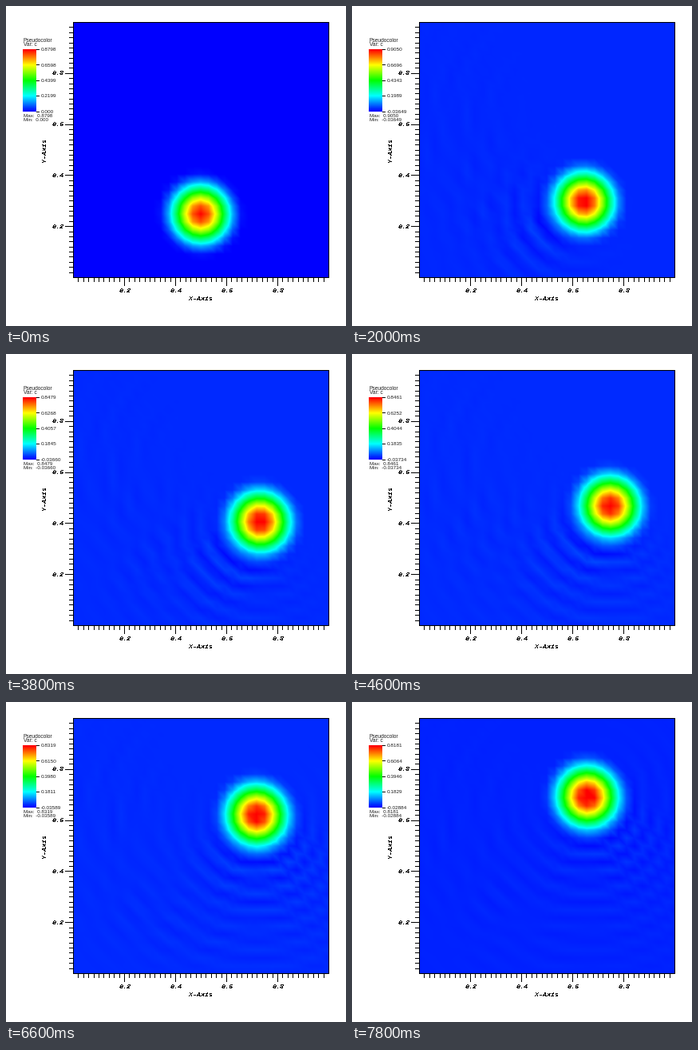
Animation, 426 px wide and 400 px high, one loop 8000 ms. Source, as a matplotlib script:

```python
import numpy as np
import matplotlib.pyplot as plt
from matplotlib.animation import FuncAnimation
from matplotlib.colors import LinearSegmentedColormap

W, H, DPI = 426, 400, 100
PX = 72 / DPI
LEFT, TOP, SIZE = 84, 20, 320
BOTTOM = TOP + SIZE
FRAMES, INTERVAL = 40, 200
CELLS = 32

# value range of the field over time
KEYS = [0, 5, 10, 15, 23, 33, 39]
MAXIMA = [0.87978, 0.9063, 0.9050, 0.8498, 0.8461, 0.8319, 0.8181]
MINIMA = [0, -0.02988, -0.03649, -0.03586, -0.03734, -0.03589, -0.02884]

rainbow = LinearSegmentedColormap.from_list(
    "rainbow5", ["#0000ff", "#00ffff", "#00ff00", "#ffff00", "#ff0000"], N=1024)

nodes = np.linspace(0, 1, CELLS + 1)
X, Y = np.meshgrid(nodes, nodes)

# position of every pixel inside the triangle mesh
pos = (np.arange(SIZE) + 0.5) / SIZE * CELLS
cell = pos.astype(int)
U, V = np.meshgrid(pos - cell, pos - cell)
I, J = np.meshgrid(cell, cell)


def interpolate(z):
    """Linear interpolation on cells split along the falling diagonal."""
    a, b, c, d = z[J, I], z[J, I + 1], z[J + 1, I], z[J + 1, I + 1]
    lower = a + U * (b - a) + V * (c - a)
    upper = d + (1 - U) * (c - d) + (1 - V) * (b - d)
    return np.where(U + V <= 1, lower, upper)


def limits(k):
    return np.interp(k, KEYS, MINIMA), np.interp(k, KEYS, MAXIMA)


def field(k):
    lo, hi = limits(k)
    turn = np.radians(3.6 * k)
    dx = X - 0.5 - 0.25 * np.sin(turn)
    dy = Y - 0.5 + 0.25 * np.cos(turn)
    r = np.hypot(dx, dy)

    # cosine hill whose top flattens with time
    radius = np.interp(k, [0, 5, 39], [0.172, 0.169, 0.176])
    hill = 0.5 + 0.5 * np.cos(np.pi * np.minimum(r / radius, 1))
    gain = np.interp(k, [5, 39], [1, 1.06])
    hill = hi * np.minimum(hill * gain / hill.max(), 1)

    # curved ripples trailing behind the hill along its circular path
    behind = np.arctan2(dy, dx) - (turn * 5 / 6 + np.pi)
    behind = np.angle(np.exp(1j * behind))
    wave = np.interp(k, [5, 15], [0.092, 0.074])
    focus = np.interp(k, [5, 33], [1.6, 0.7])
    reach = np.interp(k, [5, 33], [0.12, 0.24])
    ripple = np.cos(2 * np.pi * (r - 0.19) / wave)
    ripple *= 0.8 * np.exp(-(r - 0.19) / reach - focus * behind ** 2)
    ripple *= np.clip((r - 0.12) / 0.06, 0, 1)

    # faint broken streaks left over in the lower left
    px, py = 0.6 - X, 0.62 - Y
    rho = np.hypot(px, py) + 1e-9
    side = np.clip((px + 0.6 * py) / rho, 0, 1)
    rest = np.cos(2 * np.pi * rho / 0.085 - 0.25 * k) * np.cos(14 * (X - Y))
    rest *= 0.14 * side * np.exp(-((rho - 0.45) / 0.22) ** 2) * min(k / 10, 1)

    return interpolate(hill + lo * (ripple + rest))


fig = plt.figure(figsize=(W / DPI, H / DPI), dpi=DPI, facecolor="white")
ax = fig.add_axes([0, 0, 1, 1])
ax.axis("off")


def line(x0, y0, x1, y1):
    ax.plot([x0, x1], [y0, y1], color="black", lw=PX, antialiased=False,
            snap=False, solid_capstyle="butt", zorder=3)


def axis_text(x, y, s, **kw):
    ax.text(x, y, s, size=8.4 * PX, family="Liberation Mono", weight="bold",
            style="italic", ha="center", va="center", antialiased=False, **kw)


def legend_text(x, y, s="", size=6.5):
    return ax.text(x, y, s, size=size * PX, family="Liberation Sans",
                   color="#202020", va="center")


image = ax.imshow(field(0), cmap=rainbow, origin="lower", aspect="auto",
                  interpolation="nearest",
                  extent=(LEFT, LEFT + SIZE, BOTTOM, TOP))
ax.imshow(np.linspace(1, 0, 78)[:, None], cmap=rainbow, aspect="auto",
          interpolation="nearest", extent=(21, 38, 132, 54))
ax.set_xlim(0, W)
ax.set_ylim(H, 0)

# frame, running through pixel centres
x0, x1, y0, y1 = LEFT + 0.5, LEFT + SIZE + 0.5, TOP + 0.5, BOTTOM - 0.5
for edge in [(x0, y0, x1 + 0.5, y0), (x0, y1, x1 + 0.5, y1),
             (x0, y0, x0, y1), (x1, y0, x1, y1)]:
    line(*edge)

# ticks
for n in range(1, 50):
    major = n % 10 == 0
    length = 10 if major else 5
    tx = int(x0 + n / 50 * (x1 - x0)) + 0.5
    ty = int(y1 - n / 50 * (y1 - y0)) + 0.5
    line(tx, BOTTOM, tx, BOTTOM + length)
    line(LEFT - length, ty, LEFT, ty)
    if major:
        label = f"{n / 50:.1f}"
        axis_text(tx + 0.5, 356.5, label)
        axis_text(65, ty + 0.5, label)

axis_text(244, 366, "X-Axis")
axis_text(49, 180, "Y-Axis", rotation=90)

# legend
legend_text(21.5, 43.5, "Pseudocolor", 6.7)
legend_text(21.5, 48.5, "Var: c", 6.7)
levels = []
for i in range(5):
    y = 54 + 19.5 * i
    line(38, int(y) + 0.5, 42, int(y) + 0.5)
    levels.append(legend_text(43.5, y + 0.5, size=6.4))
max_text = legend_text(21.5, 137.5, size=6.3)
min_text = legend_text(21.5, 142.5, size=6.3)


def update(k):
    lo, hi = limits(k)
    image.set_data(field(k))
    image.set_clim(lo, hi)
    for text, value in zip(levels, np.linspace(hi, lo, 5)):
        text.set_text(f"{value:#.4g}" if value else "0.000")
    max_text.set_text(f"Max:  {hi:#.4g}")
    min_text.set_text("Min:  " + (f"{lo:#.4g}" if lo else "0.000"))
    return [image, max_text, min_text, *levels]


anim = FuncAnimation(fig, update, frames=FRAMES, interval=INTERVAL,
                     repeat=True, repeat_delay=0, blit=False)
plt.show()
```
